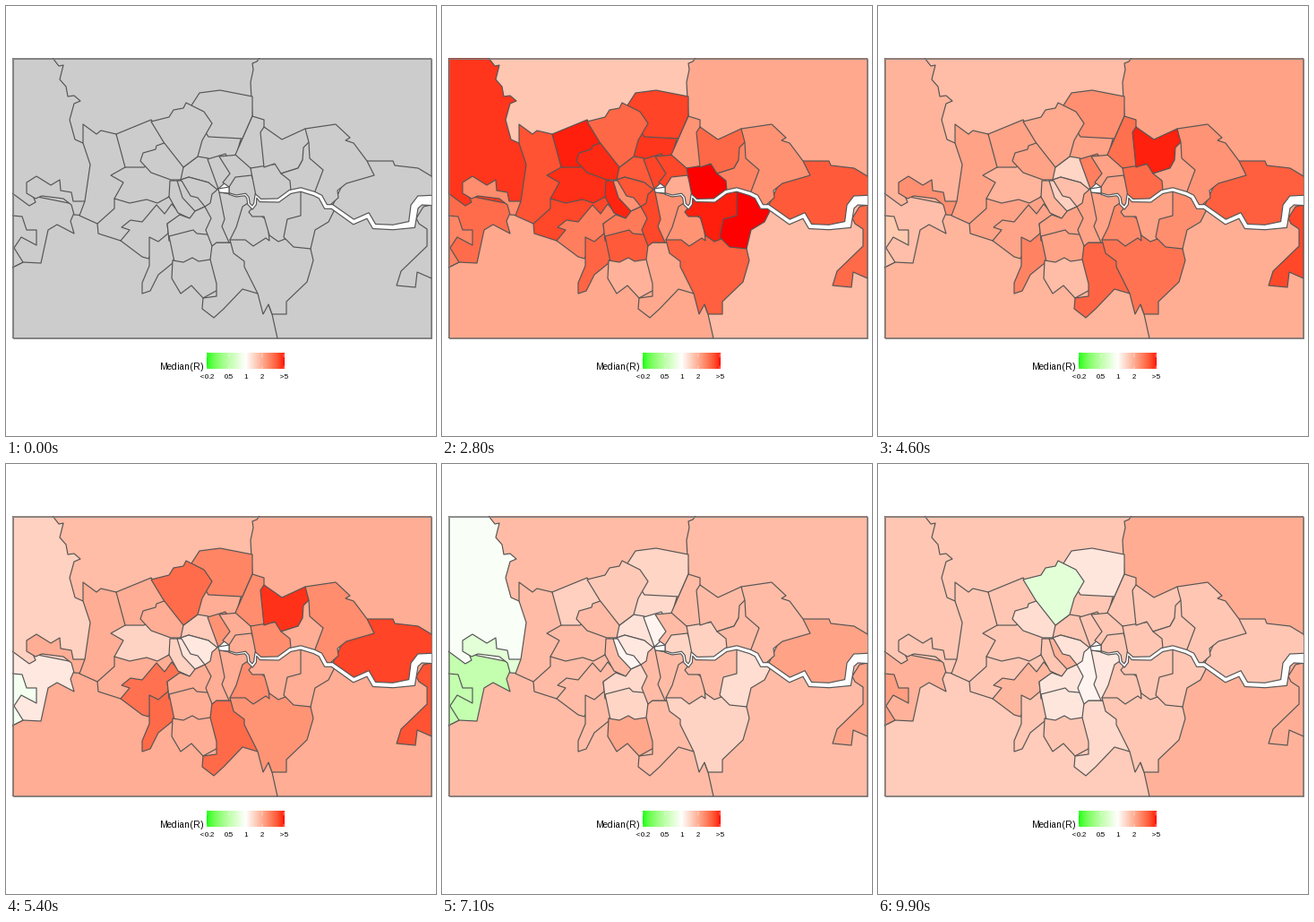
Animation of 480 by 480 pixels, one loop 10000 ms. Source, as a matplotlib script:

```python
import numpy as np
import matplotlib.pyplot as plt
from matplotlib.animation import FuncAnimation
from matplotlib.collections import PolyCollection
from matplotlib.patches import Polygon, Rectangle

plt.rcParams["text.hinting_factor"] = 1

SIZE, DPI = 480, 100
FRAMES, STEP = 100, 0.1
FADE, FIRST = 2.3, 2.8          # seconds: last empty state, first state with data
KEYS = (3.9, 5.4, 7.1, 9.9)
LINE = "#555555"

NO_DATA = np.array([82.05, 0, 0])
WHITE = np.array([100.0, 0, 0])
RED = np.array([53.24, 80.09, 67.20])
GREEN = np.array([87.73, -86.18, 83.18])


def level_lab(level):
    """Lab colour of a level from -1 (green) over 0 (white) to 1 (red)."""
    t = np.asarray(level, float)[..., None]
    return WHITE + np.where(t < 0, -t * (GREEN - WHITE), t * (RED - WHITE))


def lab_rgb(lab):
    L, a, b = np.moveaxis(np.asarray(lab), -1, 0)
    fy = (L + 16) / 116
    f = np.stack([fy + a / 500, fy, fy - b / 200], -1)
    xyz = np.where(f > 6 / 29, f ** 3, (f - 4 / 29) * 3 * (6 / 29) ** 2)
    xyz = xyz * [0.95047, 1, 1.08883]
    to_rgb = np.array([[3.2406, -1.5372, -0.4986],
                       [-0.9689, 1.8758, 0.0415],
                       [0.0557, -0.2040, 1.0570]])
    lin = np.clip(xyz @ to_rgb.T, 0, 1)
    rgb = np.where(lin > 0.0031308, 1.055 * lin ** (1 / 2.4) - 0.055, 12.92 * lin)
    return np.clip(rgb, 0, 1)


def trend(t):
    """Level that every region settles towards, in percent."""
    return 26 + 27 * np.exp((3.9 - t) / 3)


def band(line, half):
    """Outline of a ribbon along a line, with a half-width at each point."""
    d = np.diff(line, axis=0)
    d /= np.hypot(*d.T)[:, None]
    before, after = np.vstack([d[:1], d]), np.vstack([d, d[-1:]])
    mid = before + after
    mid /= np.hypot(*mid.T)[:, None]
    miter = half / np.clip((mid * after).sum(1), 0.6, 1)
    shift = np.column_stack([-mid[:, 1], mid[:, 0]]) * miter[:, None]
    return np.vstack([line + shift, (line - shift)[::-1]])


shapes, tracks = [], []


def area(start, peaks, *xy):
    """Add a region; it begins at start, follows the trend, bends to its peaks.

    Later regions cover earlier ones, so each border is exact only once.
    """
    states = {t: trend(t) for t in KEYS} | {FIRST: start} | peaks
    times = sorted(states)
    labs = level_lab(np.array([states[t] for t in times]) / 100)
    shapes.append(np.reshape(xy, (-1, 2)))
    tracks.append(([FADE, *times], np.vstack([NO_DATA, labs])))


river = np.reshape([
    249, 209.5, 257, 212, 267, 210.5, 270, 214, 271, 221, 275, 225, 278, 221,
    279, 212, 284, 217, 304, 217, 317, 207.5, 329, 205, 344, 209.5, 351, 213,
    357, 224, 364, 224, 388, 241, 404, 234, 411, 246, 432, 247, 453, 244,
    456, 224, 462, 217, 482, 217], (-1, 2)).astype(float)
estuary = river[15:].ravel()

# Surrounding counties
area(45, {8.2: 50, 9.9: 43}, 260, 58, 475, 58, 475, 200, 280, 150, 260, 120)
area(30, {3.9: 35, 5.4: 35},
     39, 58, 60, 150, 120, 200, 250, 180, 275, 123, 273, 85, 276, 71, 275, 64,
     280, 62, 283, 58)
area(35, {3.9: 42, 8.2: 48, 9.9: 40},
     290, 300, 300, 371, 475, 371, 475, 215, 350, 215)
area(45, {3.9: 36, 8.2: 48, 9.9: 27},
     7, 371, 7, 280, 60, 220, 150, 240, 280, 300, 297, 344, 303, 371)
area(92, {5.4: 24, 7.1: -4, 8.2: 25},
     7, 58, 52, 58, 59, 67, 64, 66, 60, 82, 67, 90, 69, 101, 76, 100, 83, 106,
     76, 109, 71, 127, 77, 149, 86, 153, 110, 180, 100, 225, 7, 225)
area(73, {5.4: 12, 7.1: -40, 8.0: -40, 8.5: 60, 9.9: 40},
     7, 209, 26, 223, 33, 219, 30, 212, 80, 222, 72, 240, 76, 254, 57, 244,
     47, 250, 39, 287, 19, 286, 7, 292)
area(62, {5.4: -8, 7.1: -40, 8.0: -15, 8.5: 60, 9.9: 50},
     7, 234, 18, 235, 23, 250, 34, 250, 34, 267, 17, 258, 9, 270, 19, 286,
     7, 292)
area(58, {3.9: 70, 7.1: -20, 8.0: -100, 8.5: 60},
     23, 197, 34, 190, 50, 200, 60, 194, 61, 206, 73, 208, 75, 218, 100, 218,
     90, 234, 76, 233, 73, 222, 64, 215, 40, 212, 33, 215, 23, 209)
area(74, {3.9: 90, 5.4: 83, 7.1: 47, 8.2: 48, 9.9: 42},
     475, 222, 466, 224, 458, 237, 461, 243, 470, 249, 470, 268, 441, 296,
     436, 312, 457, 314, 459, 297, 475, 304)
area(80, {3.9: 70, 5.4: 88, 7.1: 48},
     475, 190, 460, 181, 434, 178, 432, 173, 403, 173, 380, 190, *estuary)

# West
area(83, {},
     86, 132, 101, 143, 106, 139, 123, 143, 140, 180, 140, 215, 118, 236,
     102, 243, 82, 234, 88, 218, 94, 177, 86, 153)
area(94, {5.4: 23},
     133, 180, 117, 189, 131, 197, 121, 215, 140, 228, 172, 222, 190, 205,
     184, 185, 150, 170)
area(87, {},
     102, 243, 121, 226, 121, 215, 138, 220, 157, 216, 169, 220, 182, 213,
     190, 222, 160, 255, 128, 262, 103, 254)
area(65, {3.9: 26, 5.4: 71, 9.9: 38},
     128, 262, 138, 250, 129, 247, 139, 239, 152, 241, 168, 222, 177, 232,
     185, 221, 195, 233, 180, 243, 182, 262, 165, 270, 159, 282, 152, 280)
area(76, {5.4: 74, 8.2: 17},
     160, 258, 170, 263, 182, 253, 192, 270, 186, 287, 170, 300, 161, 318,
     152, 321, 152, 309, 160, 290)

# North
area(97, {7.1: 25, 8.2: 22},
     123, 143, 162, 127, 180, 150, 170, 170, 154, 180, 133, 180)
area(95, {9.9: 18},
     185, 150, 168, 156, 167, 160, 153, 164, 150, 173, 162, 186, 184, 194,
     200, 194, 205, 180)
area(92, {7.1: 20}, 222, 140, 264, 142, 256, 170, 225, 185, 212, 170, 215, 155)
area(88, {5.4: 62, 7.1: 22, 9.9: 13},
     205, 114, 216, 97, 239, 94, 275, 101, 275, 123, 264, 148, 226, 146)
area(80, {3.9: 18, 5.4: 27, 7.1: 15},
     198, 180, 214, 168, 226, 170, 240, 200, 234, 206, 226, 197, 204, 191,
     195, 194)
area(75, {3.9: 20, 5.4: 73, 7.1: 28, 8.2: -36, 9.9: -20},
     162, 129, 182, 124, 187, 116, 198, 114, 201, 108, 221, 118, 230, 131,
     219, 150, 214, 168, 198, 180, 176, 152)
area(88, {3.9: 72, 5.4: 56, 7.1: 6},
     225, 171, 245, 165, 255, 185, 246, 196, 237, 204)
area(87, {}, 238, 168, 260, 166, 275, 180, 275, 190, 249, 202, 242, 197, 250, 187)

# East
area(55, {3.9: 83, 5.4: 58},
     264, 148, 275, 123, 288, 127, 288, 135, 300, 150, 295, 182, 273, 181,
     256, 166)
area(43, {7.1: 22}, 249, 202, 256, 191, 274, 189, 280, 205, *river[7::-1].ravel())
area(100, {3.9: 88, 5.4: 58, 7.1: 24},
     273, 181, 310, 175, 325, 190, *river[10:6:-1].ravel())
area(75, {3.9: 100, 5.4: 93},
     288, 135, 308, 149, 334, 137, 345, 150, 331, 172, 326, 181, 307, 187,
     300, 176, 288, 180, 284, 141)
area(63, {},
     338, 152, 365, 185, 350, 212, 329, 205, 318, 206, 317, 195, 307, 187,
     326, 181, 331, 172, 332, 158)
area(56, {5.4: 58, 8.2: 42},
     334, 137, 368, 132, 384, 147, 379, 150, 388, 153, 403, 173, 411, 189,
     380, 198, 370, 206, 371, 214, 362, 222, *river[14:11:-1].ravel(),
     354, 183, 339, 170, 338, 152)

# Centre
area(82, {5.4: 12, 7.1: 12, 8.2: 8, 9.9: 15},
     195, 194, 204, 191, 226, 197, 236, 205, 240, 215, 228, 230, 214, 225,
     200, 205)
area(96, {5.4: 24}, 183, 195, 195, 195, 215, 229, 205, 237, 192, 231, 182, 213)
area(56, {3.9: 34, 5.4: 14, 7.1: 5, 8.2: 13, 9.9: 40},
     191, 195, 196, 195, 206, 212, 214, 214, 222, 224, 211, 229, 197, 214)

# South
area(67, {7.1: 20, 8.2: 17, 9.9: 13},
     180, 243, 194, 233, 205, 237, 211, 229, 222, 224, 240, 240, 230, 262,
     182, 262)
area(80, {7.1: 22, 9.9: 13},
     182, 257, 209, 250, 213, 254, 235, 256, 240, 270, 232, 290, 190, 295)
area(40, {3.9: 28, 7.1: 46},
     186, 284, 198, 286, 208, 281, 215, 285, 235, 282, 240, 315, 220, 326,
     207, 312, 195, 321, 185, 304)
area(45, {3.9: 78, 5.4: 74, 9.9: 20},
     230, 267, 235, 264, 260, 264, 285, 310, 281, 321, 264, 316, 243, 338,
     232, 348, 219, 338, 220, 326, 235, 324, 235, 310, 228, 283)
area(87, {9.9: 6},
     237, 204, 230, 210, 228, 220, 222, 224, 229, 237, 223, 250, 230, 268,
     235, 264, 255, 264, 250, 215)
area(57, {9.9: 12},
     238, 208, *river[:5].ravel(), 270, 240, 255, 264, 249, 264, 241, 246,
     244, 238)
area(78, {3.9: 83, 5.4: 55, 7.1: 23},
     250, 261, 267, 250, 300, 250, 321, 262, 340, 271, 343, 284, 336, 308,
     313, 330, 313, 344, 297, 344, 293, 333, 287, 344, 281, 321, 266, 291,
     266, 285, 254, 276)
area(55, {3.9: 63, 5.4: 58},
     250, 261, 257, 247, 264, 224, 270, 220, 275, 226, 292, 240, 294, 262,
     290, 259, 276, 268, 267, 261)
area(97, {},
     271, 230, *river[5:12].ravel(), 335, 210, 325, 255, 304, 263, 294, 256,
     288, 235, 275, 235)
area(100, {3.9: 71, 7.1: 18},
     *river[11:16].ravel(), 366, 229, 360, 241, 345, 250, 340, 271, 321, 269,
     310, 258, 314, 238, 329, 234)


fig = plt.figure(figsize=(SIZE / DPI, SIZE / DPI), dpi=DPI, facecolor="white")
ax = fig.add_axes([0, 0, 1, 1])
ax.axis("off")

regions = PolyCollection(shapes, edgecolors=LINE, linewidths=0.85,
                         joinstyle="round", zorder=1)
ax.add_collection(regions)
frame_box = Rectangle((7.5, 58.5), 467, 312, fill=False, ec="#808080", lw=0.7,
                      zorder=2)
ax.add_patch(frame_box)

half_width = np.interp(river[:, 0], [250, 300, 445, 470], [0.8, 2, 2.8, 6])
city = [(237, 204), (249, 202), (249, 209), (238, 208)]
holes = [Polygon(outline, fc="white", ec=LINE, lw=0.85, joinstyle="round", zorder=3)
         for outline in (band(river, half_width), city)]
for hole in holes:
    ax.add_patch(hole)
for artist in (regions, *holes):
    artist.set_clip_path(Rectangle((7, 58), 468, 313, transform=ax.transData))

# Legend
bar = lab_rgb(level_lab(np.linspace(-1, 1, 172)))[None]
ax.imshow(bar, extent=(224, 310.4, 405.3, 388), aspect="auto")
for level, label in [(0.2, "<0.2"), (0.5, "0.5"), (1, "1"), (2, "2"), (5, ">5")]:
    x = 267.3 + 43 * np.log(level) / np.log(5)
    ax.text(x, 416, label, ha="center", va="baseline",
            family="Liberation Sans", fontsize=7.6 * 0.72)
    for top in (388, 401.8):
        ax.plot([x, x], [top, top + 3.5], color="white", lw=0.35)
ax.text(171.5, 406, "Median(R)", va="baseline", family="Liberation Sans",
        fontsize=10 * 0.72)
ax.set_xlim(0, SIZE)
ax.set_ylim(SIZE, 0)


def fill(track, now):
    times, labs = track
    return lab_rgb([np.interp(now, times, channel) for channel in labs.T])


def draw(frame):
    regions.set_facecolor([fill(track, frame * STEP) for track in tracks])
    return [regions]


anim = FuncAnimation(fig, draw, frames=FRAMES, interval=STEP * 1000,
                     repeat=True, repeat_delay=0, blit=False)
plt.show()
```
